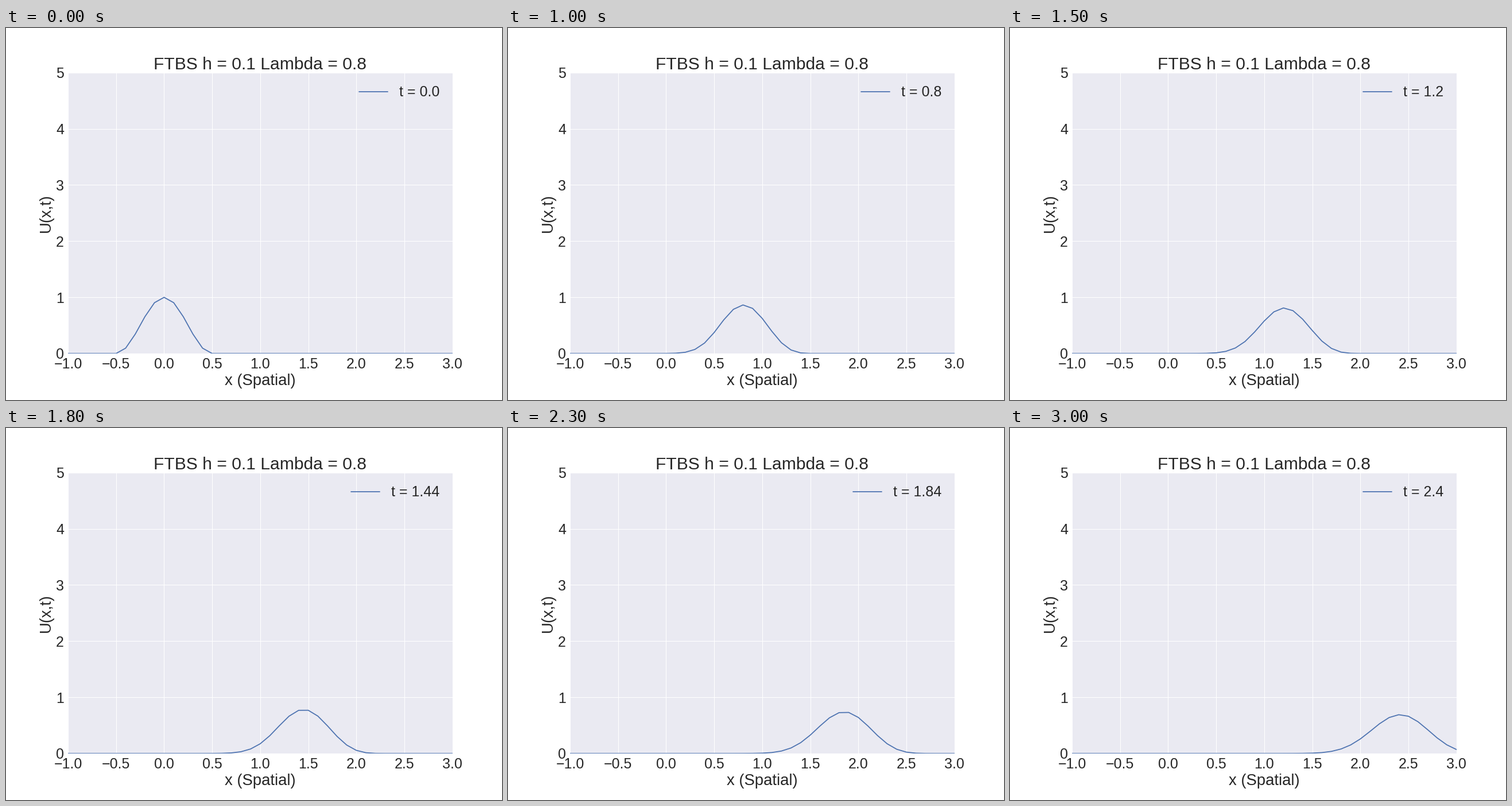
These frames come from a looping animation (864x648 px, 3.1 s). A matplotlib script:

```python
import numpy as np
import matplotlib.pyplot as plt
from matplotlib.animation import FuncAnimation

H, LAM = 0.1, 0.8
STEPS, INTERVAL = 31, 100
INK, PANEL, BLUE = "0.15", "#EAEAF2", "#4C72B0"

plt.rcParams.update({
    "font.family": "Liberation Sans",
    "text.color": INK,
    "axes.labelcolor": INK,
    "xtick.color": INK,
    "ytick.color": INK,
    "axes.unicode_minus": True,
})


def solve(x):
    """Advect a cosine-squared pulse with forward-time, backward-space steps."""
    u = np.where(np.abs(x) <= 0.5 + 1e-9, np.cos(np.pi * x) ** 2, 0.0)
    rows = [u]
    for _ in range(STEPS - 1):
        nxt = u.copy()
        nxt[1:] = (1 - LAM) * u[1:] + LAM * u[:-1]
        nxt[0] = 0.0
        rows.append(nxt)
        u = nxt
    return rows


def time_label(i):
    return f"t = {round(i * LAM * H, 2)}"


x = np.linspace(-1, 3, 41)
waves = solve(x)

fig = plt.figure(figsize=(12, 9), dpi=72, facecolor="white")
fig.subplots_adjust(left=0.125, right=0.9, bottom=0.125, top=0.88)
ax = fig.add_subplot(facecolor=PANEL)
ax.spines[:].set_visible(False)
ax.set_axisbelow(True)
ax.grid(color="white", linewidth=1)
ax.tick_params(length=0, pad=7, labelsize=25)
ax.set_xticks(np.arange(-1, 3.1, 0.5))
ax.set_yticks(range(6))
ax.set_xlim(-1, 3)
ax.set_ylim(0, 5)
ax.set_title(f"FTBS h = {H} Lambda = {LAM}", fontsize=30, pad=6)
ax.set_xlabel("x (Spatial)", fontsize=27.5, labelpad=4)
ax.set_ylabel("U(x,t)", fontsize=27.5, labelpad=4)

line, = ax.plot(x, waves[0], color=BLUE, linewidth=1.75,
                solid_capstyle="round", label=time_label(0))
legend = ax.legend(loc="upper right", frameon=False, fontsize=25)
caption = legend.get_texts()[0]


def update(i):
    line.set_ydata(waves[i])
    caption.set_text(time_label(i))
    return line, caption


anim = FuncAnimation(fig, update, frames=STEPS, interval=INTERVAL,
                     repeat=True, repeat_delay=0, blit=False)
plt.show()
```
